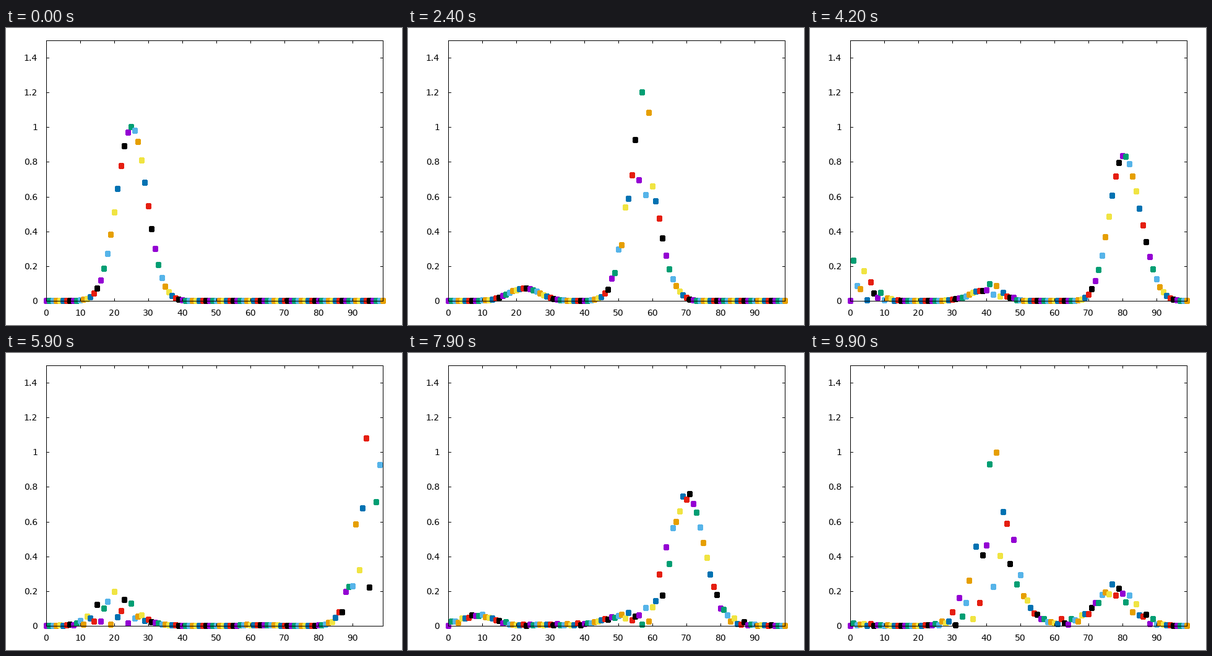
A matplotlib script that plays this animation: 640x480 px, repeating every 10000 ms.

```python
"""Gaussian wave packet on a 1D lattice crossing a square potential well."""
import numpy as np
import matplotlib.pyplot as plt
from matplotlib.animation import FuncAnimation
from matplotlib.patches import Rectangle
from matplotlib.path import Path

plt.rcParams["text.hinting"] = "native"

W, H, DPI = 640, 480, 80
PT = 72 / DPI                                # points per pixel
LEFT, RIGHT, TOP, BOTTOM = 65, 609, 20, 441  # plot box in pixels
X_MAX, Y_MAX = 99, 1.5
TICK = 4
FRAMES, INTERVAL = 100, 100
COLORS = ["#9400d3", "#009e73", "#56b4e9", "#e69f00",
          "#f0e442", "#0072b2", "#e51e10", "#000000"]

# Physics: walls at 0 and N, well on sites 40..60
N, DT, STEPS = 100, 0.1395, 10
DEPTH = 0.535
K0 = 2 * np.pi * 20 / N
SIGMA = N / 16

sites = np.arange(N)
inner = sites[1:]
well = np.where((inner >= 40) & (inner <= 60), -DEPTH, 0.0)
hop = np.full(N - 2, -0.5)
energy, modes = np.linalg.eigh(np.diag(1 + well) + np.diag(hop, 1) + np.diag(hop, -1))
start = np.exp(-(inner - N / 4) ** 2 / (2 * SIGMA ** 2) + 1j * K0 * inner)
coeffs = modes.T @ start


def density(frame):
    t = (STEPS * frame + 1) * DT
    psi = modes @ (coeffs * np.exp(-1j * energy * t))
    return np.concatenate([[0.0], np.abs(psi) ** 2])


def px(x):
    return np.round(LEFT + np.asarray(x) * (RIGHT - LEFT) / X_MAX)


def py(y):
    return np.round(BOTTOM - np.asarray(y) * (BOTTOM - TOP) / Y_MAX)


fig = plt.figure(figsize=(W / DPI, H / DPI), dpi=DPI, facecolor="white")
ax = fig.add_axes([0, 0, 1, 1])
ax.set_xlim(0, W)
ax.set_ylim(H, 0)
ax.axis("off")


def line(x0, y0, x1, y1):
    """One-pixel black line, both ends included."""
    ax.add_patch(Rectangle((x0, y0), x1 - x0 + 1, y1 - y0 + 1, fc="black",
                           lw=0, antialiased=False, zorder=3))


def label(x, y, text, ha):
    ax.text(x, y, text, ha=ha, va="baseline", family="DejaVu Sans",
            size=14 * PT, color="black", zorder=4)


for y in (TOP, BOTTOM):
    line(LEFT, y, RIGHT, y)
for x in (LEFT, RIGHT):
    line(x, TOP, x, BOTTOM)

for value in range(0, 100, 10):
    x = px(value)
    line(x, BOTTOM - TICK, x, BOTTOM)
    line(x, TOP, x, TOP + TICK)
    label(x, 465, str(value), "center")

for i in range(8):
    y = py(0.2 * i)
    line(LEFT, y, LEFT + TICK, y)
    line(RIGHT - TICK, y, RIGHT, y)
    label(51, y + 5, f"{0.2 * i:.2g}", "right")

# Dot: 9 by 10 pixels with cut corners
corner = np.array([[2.5, 5], [4.5, 3]])
dot = np.vstack([corner, corner[::-1] * [1, -1], -corner, corner[::-1] * [-1, 1]])
dot = Path(np.vstack([dot, dot[:1]]), closed=True)
dots = ax.scatter(px(sites) + 0.5, np.full(N, BOTTOM), marker=dot,
                  s=(10 * PT) ** 2, c=[COLORS[i % 8] for i in sites],
                  linewidths=0, antialiased=False, snap=False, zorder=2)


def update(frame):
    p = density(frame)
    y = np.where(p <= Y_MAX, py(p), -50)   # points above the box are hidden
    dots.set_offsets(np.column_stack([px(sites) + 0.5, y]))
    return [dots]


anim = FuncAnimation(fig, update, frames=FRAMES, interval=INTERVAL,
                     repeat=True, repeat_delay=0)
plt.show()
```
